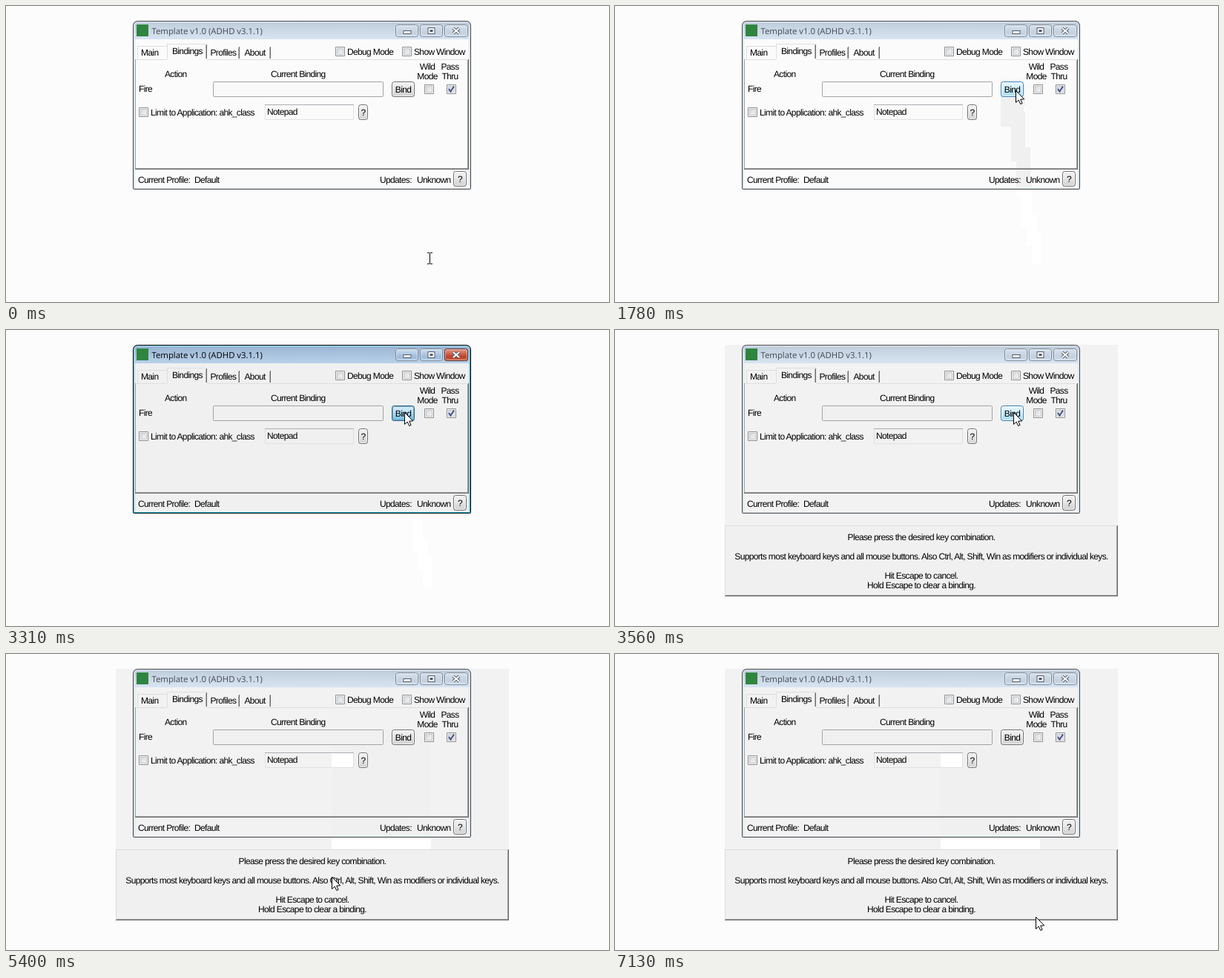
These frames come from a looping animation (813 by 400 pixels, 8000 ms). An HTML page with a canvas:

```html
<!DOCTYPE html>
<html lang="en">
<head>
<meta charset="utf-8">
<title>Key binding dialog</title>
<style>
  html, body { margin: 0; width: 100%; height: 100%; overflow: hidden; background: #fcfcfc; }
  canvas { display: block; }
</style>
</head>
<body>
<canvas id="stage" width="813" height="400"></canvas>
<script>
const ctx = document.getElementById('stage').getContext('2d');
const LOOP = 8000, TICK = 138;
const ARROW = 700, HOVER = 1120, SWAY = 1240, ACTIVATE = 3310, PROMPT = 3560, LEAVE = 4740, REPAINT = 5400;
const UI_FONT = '12px "Liberation Sans", Arial, sans-serif';
const TITLE_FONT = '11.35px "Open Sans", "Noto Sans", sans-serif';

// Turning points of the pointer: time, x, y. It moves straight between them, one hop per tick.
const turns = [
  [0, 568, 333], [270, 568, 332], [550, 555, 282], [970, 534, 144], [SWAY, 531, 106],
  [4450, 537, 111], [4590, 536, 136], [4980, 550, 282], [5250, 487, 303], [REPAINT, 439, 301],
  [5800, 590, 304], [6070, 453, 305], [6220, 508, 308], [6730, 568, 336], [6870, 568, 336],
  [7130, 567, 355]
];

function pointerAt(t) {
  const size = t < ARROW ? { w: 7, h: 17 } : { w: 12, h: 19 };
  const i = turns.findLastIndex(turn => turn[0] <= t);
  const [t0, x0, y0] = turns[i];
  const [t1, x1, y1] = turns[i + 1] ?? [LOOP, x0, y0];
  const ticks = Math.floor((t - t0) / TICK);
  if (t0 === SWAY) {
    // Shake over the button, dying out after nine ticks.
    const sway = (ticks % 2 ? 1 : -1) * Math.max(0, 1 - ticks / 9);
    return { x: Math.round(537 + 5 * sway), y: Math.round(111 + 4 * sway), ...size };
  }
  const p = ticks * TICK / (t1 - t0);
  return { x: Math.round(x0 + (x1 - x0) * p), y: Math.round(y0 + (y1 - y0) * p), ...size };
}

function rect(x, y, w, h, color) {
  ctx.fillStyle = color;
  ctx.fillRect(x, y, w, h);
}

function frame(x, y, w, h, color, radius = 0) {
  ctx.strokeStyle = color;
  ctx.lineWidth = 1;
  ctx.beginPath();
  ctx.roundRect(x + .5, y + .5, w - 1, h - 1, radius);
  ctx.stroke();
}

function gradient(x0, y0, x1, y1, ...stops) {
  const g = ctx.createLinearGradient(x0, y0, x1, y1);
  stops.forEach((color, i) => g.addColorStop(i / (stops.length - 1), color));
  return g;
}

function text(str, x, y, { align = 'left', color = '#000', font = UI_FONT, spacing = '-0.65px' } = {}) {
  ctx.font = font;
  ctx.letterSpacing = spacing;
  ctx.textRendering = 'geometricPrecision';
  ctx.textAlign = align;
  ctx.fillStyle = color;
  ctx.fillText(str, x, y);
}

function polyline(color, width, ...points) {
  ctx.beginPath();
  points.forEach(([x, y]) => ctx.lineTo(x, y));
  ctx.strokeStyle = color;
  ctx.lineWidth = width;
  ctx.stroke();
}

const buttonLooks = {
  normal: ['#707070', '#f2f2f2', '#ebebeb', '#dddddd', '#cfcfcf'],
  hot: ['#3c7fb1', '#eaf6fd', '#d9f0fc', '#bee6fd', '#a7d9f5'],
  pressed: ['#2c628b', '#d5ecf8', '#c4e5f6', '#98d1ef', '#68b3db']
};

function button(x, y, w, h, label, look = 'normal') {
  const [edge, ...fill] = buttonLooks[look];
  ctx.beginPath();
  ctx.roundRect(x, y, w, h, 3);
  ctx.fillStyle = gradient(0, y, 0, y + h, ...fill);
  ctx.fill();
  frame(x + 1, y + 1, w - 2, h - 2, look === 'pressed' ? '#7ba9c6' : 'rgba(255,255,255,.75)', 2);
  frame(x, y, w, h, edge, 3);
  text(label, x + w / 2, y + 15, { align: 'center' });
}

function checkbox(x, y, checked) {
  rect(x, y, 13, 13, '#f6f6f6');
  frame(x, y, 13, 13, '#8e8f8f');
  rect(x + 2, y + 2, 9, 9, gradient(x, y, x + 12, y + 12, '#c6cace', '#e4e6e8', '#f7f7f7'));
  frame(x + 2, y + 2, 9, 9, '#c3c7cb');
  if (checked) polyline('#3f528f', 2, [x + 3, y + 6], [x + 5.5, y + 9.5], [x + 10, y + 2.5]);
}

function captionButton(x, w, kind, active) {
  const red = active && kind === 'close';
  const fill = red ? ['#e5a093', '#d0705b', '#bb402a', '#cf6b50']
    : active ? ['#cfdff0', '#b9cfe6', '#9dbadb', '#b8d2ec']
    : ['#d9e3ed', '#cdd9e6', '#c3d1e0', '#d3dfeb'];
  ctx.beginPath();
  ctx.roundRect(x, 25, w, 17, 3);
  ctx.fillStyle = gradient(0, 25, 0, 42, ...fill);
  ctx.fill();
  frame(x + 1, 26, w - 2, 15, 'rgba(255,255,255,.45)', 2);
  frame(x, 25, w, 17, red ? '#5b2a24' : '#7b8895', 3);
  const cx = x + w / 2, ink = '#535a66';
  if (kind === 'min') {
    rect(cx - 5, 33, 11, 5, ink);
    rect(cx - 4, 34, 9, 3, '#fff');
  } else if (kind === 'max') {
    rect(cx - 5, 29, 10, 9, ink);
    rect(cx - 4, 30, 8, 7, '#fff');
    rect(cx - 2, 32, 4, 3, ink);
  } else {
    for (const [color, width] of [[ink, 4], ['#fff', 2]]) {
      polyline(color, width, [cx - 4, 30], [cx + 4, 37]);
      polyline(color, width, [cx + 4, 30], [cx - 4, 37]);
    }
  }
}

function windowFrame(active) {
  const corners = [6, 6, 1, 1];
  ctx.beginPath();
  ctx.roundRect(171, 20, 456, 228, corners);
  ctx.fillStyle = active ? gradient(0, 21, 0, 45, '#98b4d2', '#b9d1ea')
    : gradient(0, 21, 0, 45, '#bfcddb', '#d7e4f2');
  ctx.fill();
  frame(172, 21, 454, 226, active ? '#8fdcee' : '#e3ecf4', 5);
  if (active) {
    rect(172, 246, 454, 1, '#2fbcd6');
    rect(625, 26, 1, 220, '#2fbcd6');
  }
  frame(171, 20, 456, 228, active ? '#000' : '#434343', corners);
  rect(176, 25, 16, 16, '#2f8540');
  text('Template v1.0 (ADHD v3.1.1)', 196.5, 38, { font: TITLE_FONT, spacing: '0px', color: active ? '#000' : '#434a52' });
  captionButton(525, 31, 'min', active);
  captionButton(558, 31, 'max', active);
  captionButton(591, 32, 'close', active);
}

function tabs() {
  const light = '#dedede', dark = '#696969';
  rect(177, 54, 40, 1, light);
  rect(177, 54, 1, 18, light);
  rect(217, 51, 53, 1, light);
  rect(217, 52, 1, 20, light);
  rect(175, 72, 42, 1, light);
  rect(271, 72, 351, 1, light);
  for (const [x, y] of [[270, 52], [314, 55], [356, 55]]) {
    rect(x, y, 1, 71 - y, dark);
    rect(x - 1, y + 1, 1, 70 - y, '#b0b0b0');
  }
  rect(174, 72, 1, 149, '#a8a8a8');
  rect(622, 73, 1, 147, '#a0a0a0');
  rect(623, 72, 1, 149, dark);
  rect(175, 219, 448, 1, '#a0a0a0');
  rect(174, 220, 450, 1, dark);
  text('Main', 182, 67);
  text('Bindings', 224, 65);
  text('Profiles', 275.5, 67);
  text('About', 321.5, 67);
}

// Every hop of the pointer repaints the box around its old and new place.
function trail(t, color) {
  let last = pointerAt(0);
  for (let s = 0; s <= Math.min(t, ACTIVATE); s += 20) {
    const next = pointerAt(s);
    if (next.x !== last.x || next.y !== last.y) {
      const x = Math.min(last.x, next.x), y = Math.min(last.y, next.y);
      const right = Math.max(last.x + last.w, next.x + next.w);
      const bottom = Math.max(last.y + last.h, next.y + next.h);
      rect(x, y, right - x, bottom - y, color);
    }
    last = next;
  }
}

function clientArea(t) {
  const prompted = t >= PROMPT, repainted = t >= REPAINT;
  const base = prompted ? '#f2f2f2' : t >= ACTIVATE ? '#f0f0f0' : '#fbfbfb';
  ctx.save();
  ctx.beginPath();
  ctx.rect(174, 45, 450, 201);
  ctx.clip();
  rect(174, 45, 450, 201, base);
  if (!prompted) trail(t, '#f0f0f0');
  if (t >= HOVER && !prompted) rect(520, 102, 31, 61, '#f0f0f0');
  if (repainted) rect(439, 102, 134, 144, '#f0f0f0');
  ctx.restore();

  tabs();
  checkbox(444, 55);
  text('Debug Mode', 460, 66);
  checkbox(534, 55);
  text('Show Window', 550, 66);

  text('Action', 214, 96);
  text('Current Binding', 357, 96);
  text('Wild', 568, 86, { align: 'center' });
  text('Mode', 568, 99, { align: 'center' });
  text('Pass', 598.5, 86, { align: 'center' });
  text('Thru', 598.5, 99, { align: 'center' });

  text('Fire', 179, 116);
  rect(279, 102, 230, 21, t >= ACTIVATE ? '#f0f0f0' : '#f9f9f9');
  frame(279, 102, 230, 21, '#a3a3a3', 1);
  const look = t < HOVER || t >= LEAVE ? 'normal' : t >= ACTIVATE && !prompted ? 'pressed' : 'hot';
  button(520, 102, 31, 21, 'Bind', look);
  checkbox(564, 106);
  checkbox(594, 106, true);

  checkbox(179, 137);
  text('Limit to Application: ahk_class', 195, 148);
  rect(349, 133, 120, 21, base);
  if (repainted) rect(439, 134, 29, 19, '#fff');
  frame(349, 133, 120, 21, '#e0e1e4');
  rect(349, 133, 120, 1, '#abadb3');
  text('Notepad', 352, 147);
  button(475, 133, 13, 21, '?');

  text('Current Profile:', 178, 239);
  text('Default', 254, 239);
  text('Updates:', 504, 239);
  text('Unknown', 554, 239);
  button(603, 223, 18, 21, '?');
}

function backdrop(t) {
  rect(0, 0, 813, 400, '#fcfcfc');
  if (t < PROMPT) return trail(t, '#fff');
  rect(148, 20, 530, 340, '#f2f2f2');
  if (t >= REPAINT) rect(439, 248, 134, 16, '#fff');
}

function promptPanel() {
  rect(148, 264, 530, 96, '#f0f0f0');
  rect(148, 264, 530, 1, '#dcdcdc');
  rect(148, 264, 1, 96, '#dcdcdc');
  rect(676, 265, 1, 94, '#a0a0a0');
  rect(677, 264, 1, 96, '#696969');
  rect(149, 358, 528, 1, '#a0a0a0');
  rect(148, 359, 530, 1, '#696969');
  const line = (str, y) => text(str, 413, y, { align: 'center' });
  line('Please press the desired key combination.', 284);
  line('Supports most keyboard keys and all mouse buttons. Also Ctrl, Alt, Shift, Win as modifiers or individual keys.', 310);
  line('Hit Escape to cancel.', 336);
  line('Hold Escape to clear a binding.', 349);
}

function textCursor(x, y) {
  for (const top of [y, y + 15]) {
    rect(x, top, 3, 1, '#000');
    rect(x + 4, top, 3, 1, '#000');
  }
  rect(x + 3, y + 1, 1, 14, '#000');
}

function arrow(x, y) {
  ctx.beginPath();
  for (const [dx, dy] of [[0, 0], [0, 16], [3.7, 12.6], [6.2, 18], [8.6, 17], [6.2, 11.7], [11.2, 11.4]])
    ctx.lineTo(x + .5 + dx, y + .5 + dy);
  ctx.closePath();
  ctx.fillStyle = '#fff';
  ctx.fill();
  ctx.strokeStyle = '#000';
  ctx.lineWidth = 1;
  ctx.stroke();
}

function draw() {
  const t = performance.now() % LOOP;
  backdrop(t);
  windowFrame(t >= ACTIVATE && t < PROMPT);
  clientArea(t);
  if (t >= PROMPT) promptPanel();
  const { x, y } = pointerAt(t);
  (t < ARROW ? textCursor : arrow)(x, y);
  requestAnimationFrame(draw);
}
draw();
</script>
</body>
</html>
```
